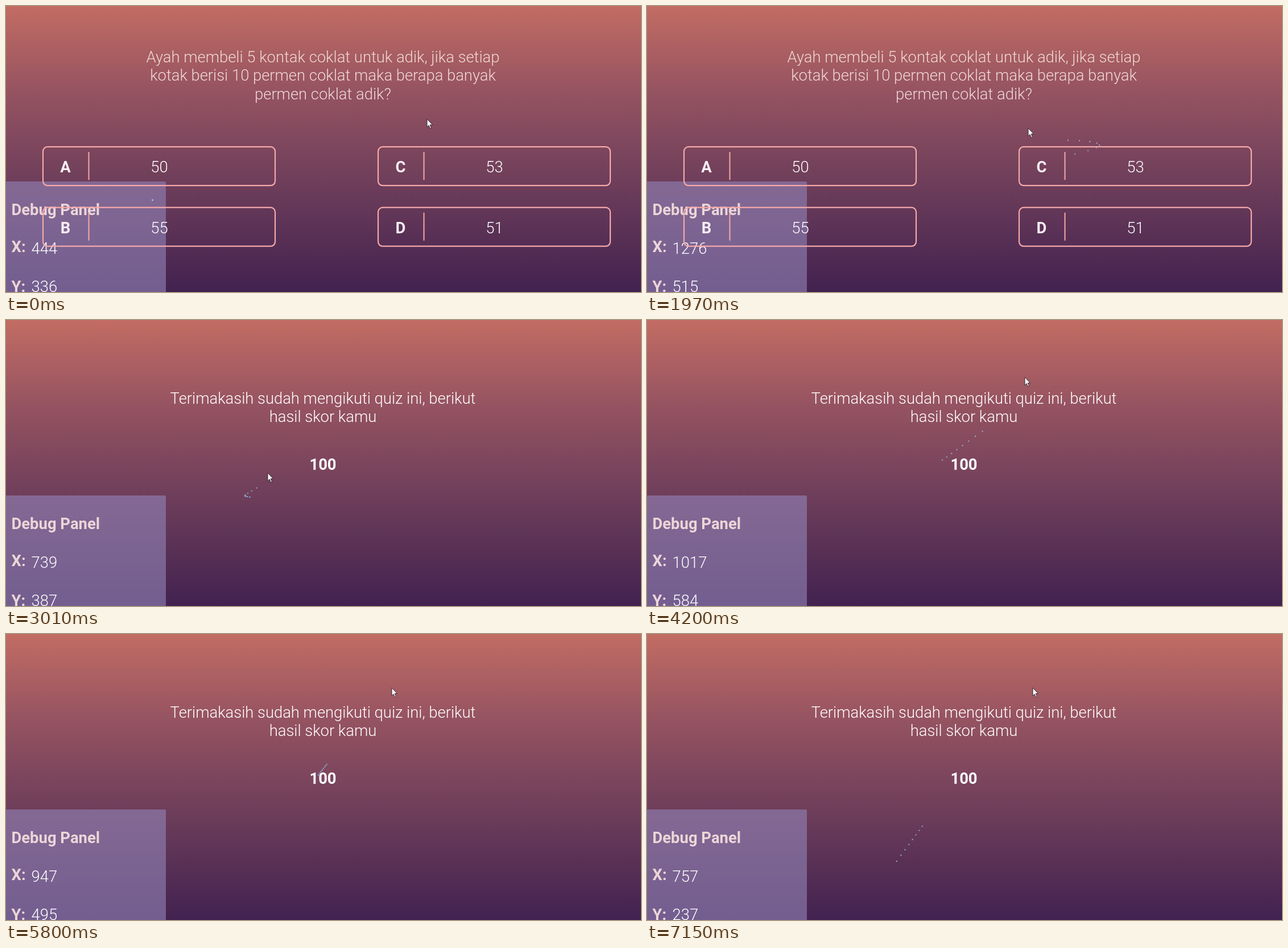
These frames come from a looping animation (1116x502 px, 7.23 s). An HTML page with a canvas:

```html
<!DOCTYPE html>
<html lang="id">
<head>
<meta charset="utf-8">
<title>Quiz</title>
<style>
  html, body { margin: 0; width: 100%; height: 100%; overflow: hidden; background: #703f5b; }
  canvas { display: block; }
</style>
</head>
<body>
<canvas id="stage" width="1116" height="502"></canvas>
<script>
const ctx = document.getElementById('stage').getContext('2d');
const W = 1116, H = 502;
const LOOP = 7230, STEPS = 91, STEP = LOOP / STEPS;
const QUIZ_END = 36;
const FONT = '27.4px Roboto, sans-serif';

// Resting points of the tracker, in the units of the debug panel
const gazeStops = [
  { s: 0, x: 444, y: 336 }, { s: 17, x: 751, y: 235 }, { s: 33, x: 706, y: 392 },
  { s: 38, x: 739, y: 387 }, { s: 53, x: 1017, y: 584 }, { s: 73, x: 947, y: 495 },
  { s: 90, x: 757, y: 237 }
];

// Resting points of the mouse, in pixels
const mouseStops = [
  { s: 21, x: 740, y: 198 }, { s: 33, x: 470, y: 259 }, { s: 38, x: 460, y: 268 },
  { s: 53, x: 664, y: 100 }, { s: 58, x: 678, y: 94 }
];

const sky = ctx.createLinearGradient(0, 0, 0, H);
['#c26c63', '#955361', '#703f5b', '#422250']
  .forEach((color, i) => sky.addColorStop(Math.min(1, i * 0.3 + (i > 2 ? 0.1 : 0)), color));

const smooth = u => u * u * (3 - 2 * u);
const late = u => u ** 6;

function between(stops, s, ease) {
  let i = 0;
  while (i < stops.length - 2 && s > stops[i + 1].s) i++;
  const a = stops[i], b = stops[i + 1], span = b.s - a.s;
  const u = Math.min(1, Math.max(0, (s - a.s) / span));
  const e = ease(u);
  return { x: a.x + (b.x - a.x) * e, y: a.y + (b.y - a.y) * e, i, u, span };
}

// The gaze swings out to the upper right between stops, less each time
function gaze(s) {
  const { x, y, i, u, span } = between(gazeStops, s, late);
  const reach = 62 * span / (1 + i / 2) * Math.sin(Math.PI * u) ** 4;
  const sway = 0.85 + 0.15 * Math.sin(1.9 * s);
  return { x: x + reach * sway, y: y + reach * 0.42 };
}

function text(str, x, y, { weight = 300, color = '#fff', align = 'center' } = {}) {
  ctx.font = weight + ' ' + FONT;
  ctx.fillStyle = color;
  ctx.textAlign = align;
  ctx.fillText(str, x, y);
}

function paragraph(lines, y, color) {
  lines.forEach((line, i) => text(line, 557, y + i * 32.2, { color }));
}

function answer(letter, value, x, y, hover) {
  ctx.strokeStyle = hover ? '#f8a3a3' : '#f6a9a9';
  ctx.lineWidth = 2.2;
  ctx.beginPath();
  ctx.roundRect(x, y, 408, 68, 8);
  ctx.stroke();
  ctx.lineWidth = 2;
  ctx.beginPath();
  ctx.moveTo(x + 80.5, y + 9);
  ctx.lineTo(x + 80.5, y + 58);
  ctx.stroke();
  text(letter, x + 39.5, y + 44.8, { weight: 700, color: '#f8eef3' });
  text(value, x + 204.5, y + 44.8);
}

function panel({ x, y }) {
  ctx.fillStyle = 'rgba(145, 132, 182, 0.62)';
  ctx.beginPath();
  ctx.roundRect(-4, 308, 285, 200, 2);
  ctx.fill();
  const label = { weight: 700, color: '#ecd6d8', align: 'left' };
  const value = { align: 'left' };
  text('Debug Panel', 9.5, 367, label);
  text('X:', 9.5, 432, label);
  text('Y:', 9.5, 501.5, label);
  text(Math.round(x), 44.6, 434.5, value);
  text(Math.round(y), 44.6, 502, value);
}

function quiz(mouse) {
  paragraph([
    'Ayah membeli 5 kontak coklat untuk adik, jika setiap',
    'kotak berisi 10 permen coklat maka berapa banyak',
    'permen coklat adik?'
  ], 99.2, '#f0d8d6');
  ['50', '55', '53', '51'].forEach((value, i) => {
    const x = i < 2 ? 65 : 654, y = 247.2 + (i % 2) * 106.5;
    const hover = mouse.x > x && mouse.x < x + 408 && mouse.y > y && mouse.y < y + 68;
    answer('ABCD'[i], value, x, y, hover);
  });
}

function result() {
  paragraph(['Terimakasih sudah mengikuti quiz ini, berikut', 'hasil skor kamu'], 147.2);
  text('100', 557, 263, { weight: 700 });
}

function trail(s) {
  for (let i = 7; i >= 0; i--) {
    const { x, y } = gaze(s - i * 0.2);
    ctx.fillStyle = `rgba(150, 193, 232, ${1 - i * 0.03})`;
    ctx.beginPath();
    ctx.arc(x / 1.725, 537.8 - y / 1.705, 1.15, 0, Math.PI * 2);
    ctx.fill();
  }
}

function pointer({ x, y }) {
  ctx.save();
  ctx.translate(Math.round(x), Math.round(y) + 0.5);
  const arrow = new Path2D('M0 0V14L3 11L5.5 16.5L7.5 15.5L5.2 10.2L9.5 10Z');
  ctx.fillStyle = '#fff';
  ctx.fill(arrow);
  ctx.strokeStyle = '#2a1a28';
  ctx.lineWidth = 0.9;
  ctx.stroke(arrow);
  ctx.restore();
}

function draw(ms) {
  const s = Math.min(STEPS - 1, Math.floor((ms % LOOP + 20) / STEP));
  const mouse = between(mouseStops, s, smooth);
  ctx.fillStyle = sky;
  ctx.fillRect(0, 0, W, H);
  panel(gaze(s));
  if (s < QUIZ_END) quiz(mouse);
  else result();
  trail(s);
  pointer(mouse);
}

let start;
function tick(now) {
  start ??= now;
  draw(Math.max(0, now - start));
  requestAnimationFrame(tick);
}
draw(0);
requestAnimationFrame(tick);
</script>
</body>
</html>
```
